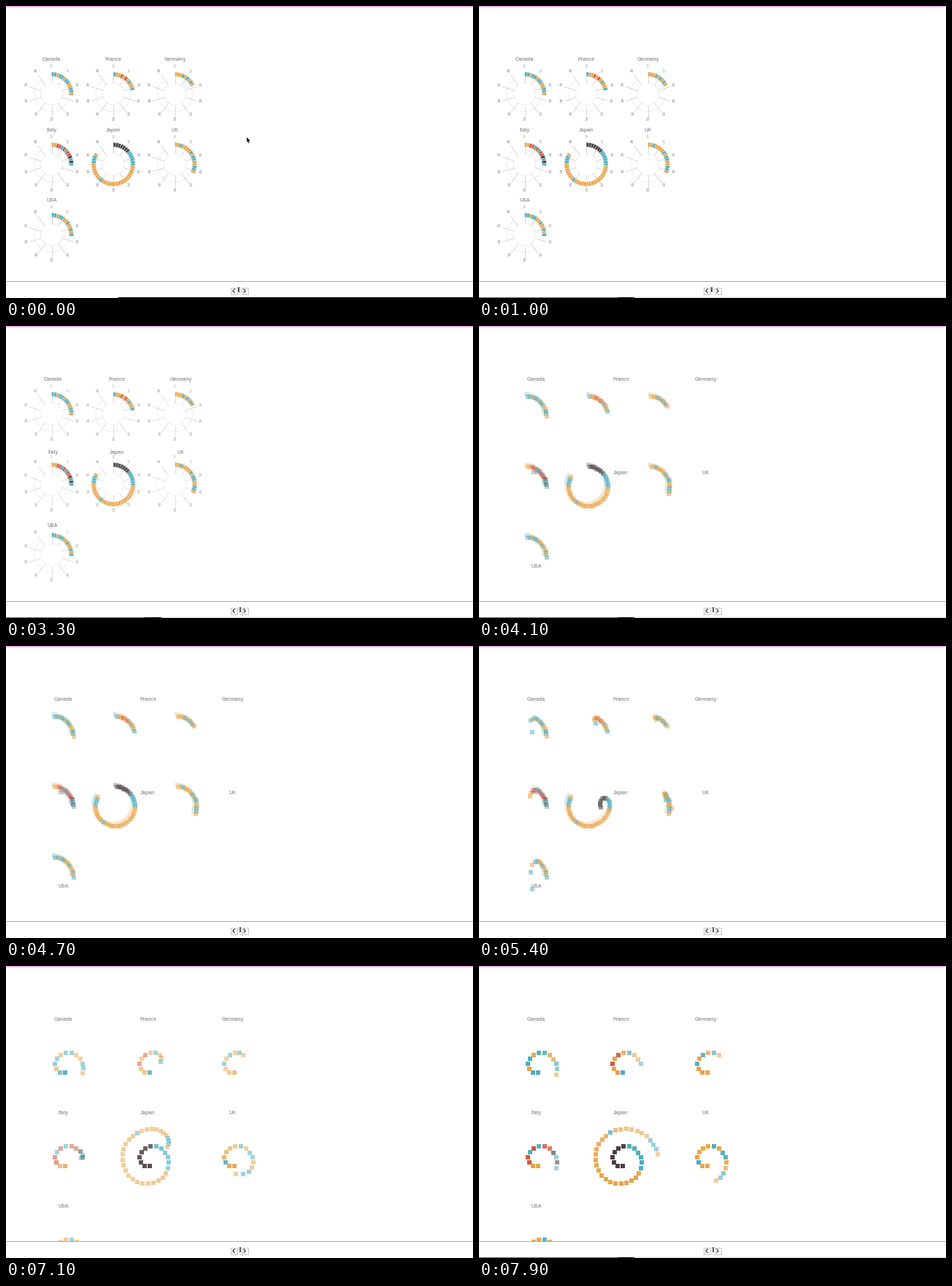
Write a matplotlib script that moves like this. It is 640 px wide and 400 px high and loops after 8000 ms.

```python
import numpy as np
import matplotlib.pyplot as plt
from matplotlib.animation import FuncAnimation
from matplotlib.collections import LineCollection, PolyCollection
from matplotlib.colors import to_rgb
from matplotlib.patches import Arc, Polygon, Rectangle

W, H, DPI = 640, 400, 100
FRAMES, STEP = 80, 100
PX = 72 / DPI
MORPH = 3000                 # rings start turning into squares, ms
MOVE, FADE = 1667, 1150      # spiral flight and solidifying times, ms
DIM, GHOST = 0.53, 0.3       # opacity of waiting squares and leftover arcs
SIZE = 6

COLORS = dict(b="#4dafc0", o="#e9a54b", r="#d4573f", k="#4b4041")

# name, item types, first and last launch in ms, bend of the launch curve
COUNTRIES = [
    ("Canada", "bbobbobboobbo", 4610, 5870, 0.6),
    ("France", "boororoboob", 4805, 6050, 0.95),
    ("Germany", "ooobobobo", 4930, 5833, 0.85),
    ("Italy", "oorrbrbrrkbkb", 4825, 6090, 1.05),
    ("Japan", "k" * 7 + "b" * 6 + "o" * 17 + "b" + "o" * 7 + "bbbo",
     4667, 6050, 1.1),
    ("UK", "ooboooobobboobbo", 4650, 5990, 1.25),
    ("USA", "bbobbooboobob", 4633, 5870, 0.78),
]


def ease(u):
    u = np.clip(u, 0, 1)
    return np.where(u < 0.5, 4 * u**3, 1 - 4 * (1 - u)**3)


def polar(r, turn):
    """Point at radius r, clockwise from the top, in degrees."""
    a = np.radians(turn)
    return np.stack([r * np.sin(a), -r * np.cos(a)], axis=-1)


def spiral(n, gap=7.52):
    """Evenly spaced points on an Archimedean spiral starting at the bottom."""
    th = np.linspace(0, 13, 4000)
    b = 24 / (2 * np.pi)
    r = 7.5 + b * th
    length = np.concatenate([[0], np.cumsum(np.hypot(r, b)[:-1] * np.diff(th))])
    t = np.interp(np.arange(n) * gap, length, th)
    return polar(7.5 + b * t, 180 + np.degrees(t))


fig = plt.figure(figsize=(W / DPI, H / DPI), dpi=DPI, facecolor="white")
ax = fig.add_axes([0, 0, 1, 1])
ax.set(xlim=(0, W), ylim=(H, 0))
ax.axis("off")


def bar(x, y, w, h, color, **kw):
    return ax.add_patch(Rectangle((x, y), w, h, fc=color, lw=0, **kw))


def label(x, y, s, px, color, **kw):
    return ax.text(x, y, s, fontsize=px * PX, color=color, ha="center",
                   va="baseline", family="Liberation Sans", **kw)


def draw_grid(c):
    """Dial with ten spokes and their numbers; returns its artists."""
    turns = np.arange(10) * 36
    spokes = np.stack([c + polar(15, turns), c + polar(32, turns)], axis=1)
    parts = [ax.add_collection(
        LineCollection(spokes, colors="#b4b4b4", linewidths=0.5 * PX, zorder=1))]
    for r in (15, 24):
        parts.append(ax.add_patch(
            Arc(c, 2 * r, 2 * r, theta1=-90, theta2=234, ec="#c0c0c0",
                lw=0.5 * PX, ls=(0, (1.5, 1.5)), zorder=1)))
    for i, (x, y) in enumerate(c + polar(36.5, turns)):
        parts.append(label(x, y + 0.4, str(5 * i), 4.8, "#8c8c8c"))
    return parts


grid, titles = [], []
slices, homes, goals, colors, starts = [], [], [], [], []
for k, (name, kinds, first, last, bend) in enumerate(COUNTRIES):
    row, col = divmod(k, 3)
    old = np.array([62.5 + 84.5 * col, 72.5 + 96.5 * row])
    new = np.array([78.5 + 116 * col, 72.5 + 128 * row])
    titles.append((label(*old, name, 7, "#999999", weight="bold", zorder=2),
                   old, new))
    hub = old + (0, 48)
    grid += draw_grid(hub)

    n = len(kinds)
    a = np.arange(n) * 7.2
    slices.append(hub + np.stack(
        [polar(30, a), polar(30, a + 7.2), polar(24, a + 7.2), polar(24, a)],
        axis=1))
    homes.append(hub + polar(27, a + 3.6) + SIZE / 2)
    goals.append(new + (2.75, 66.25) + spiral(n))
    colors += [to_rgb(COLORS[c]) for c in kinds]
    starts.append(first + (last - first) * np.linspace(0, 1, n) ** bend)

slices, homes, goals, starts = map(
    np.concatenate, (slices, homes, goals, starts))
square = SIZE / 2 * np.array([[-1, -1], [1, -1], [1, 1], [-1, 1]])


def add_tiles(verts, **kw):
    tiles = ax.add_collection(PolyCollection(verts, zorder=3, **kw))
    tiles.set_clip_path(Rectangle((0, 0), W, 377, transform=ax.transData))
    return tiles


def tint(tiles, alpha):
    tiles.set_facecolor(np.column_stack([colors, alpha]))


arcs = add_tiles(slices, linewidths=0.5 * PX)
squares = add_tiles(homes[:, None] + square, linewidths=0)

# frame and controls
bar(0, 0, W, 1, "#ff80ff")
bar(0, 377, W, 1, "#acacac", zorder=4)
for x, d in ((307, -1), (322, 1)):
    ax.add_patch(Rectangle((x + 0.5, 385.5), 9, 9, fc="white", ec="#c4c4c4",
                           lw=PX, zorder=5))
    cx = x + 5
    ax.plot([cx - 1.2 * d, cx + 1.2 * d, cx - 1.2 * d], [387.8, 390.2, 392.6],
            color="#222222", lw=1.1 * PX, zorder=6)
knob = bar(318, 385, 2.2, 7, "#555555", zorder=6)
cursor = ax.add_patch(Polygon(
    np.array([330, 180]) + [(0, 0), (0, 6.5), (1.5, 5.2), (2.6, 8),
                            (3.7, 7.5), (2.6, 4.8), (4.6, 4.6)],
    fc="black", lw=0, zorder=7))

bold_edge = [bar(154, 398.8, W - 154, 1.2, "black")]
thin_edge = [bar(0, 399, W, 1, "#d0d0d0"), bar(0, 399, 190, 1, "#606060"),
             bar(190, 399, 23, 1, "black")]


def draw(i):
    t = i * STEP
    p = float(ease((t - MORPH) / 1000))
    flight = (t - starts) / MOVE
    solid = ease((t - starts - MOVE) / FADE)

    left = np.clip(1 - 4 * flight, 0, 1)
    tint(arcs, (1 + (GHOST - 1) * p) * left)
    arcs.set_edgecolor((1, 1, 1, 0.75 * (1 - p)))
    spots = homes + (goals - homes) * ease(flight)[:, None]
    squares.set_verts(spots[:, None] + square)
    tint(squares, DIM * p + (1 - DIM) * solid)

    for text, old, new in titles:
        x, y = old + (new - old) * p
        text.set_position((x, y + 2.5))
    for item in grid:
        item.set_alpha(1 - float(ease((t - MORPH) / 800)))

    knob.set_x(318 if t < MORPH else 319.5)
    cursor.set_visible(t < 1000)
    for item in bold_edge:
        item.set_visible(t < 1000)
    for item in thin_edge:
        item.set_visible(1000 <= t < 4600 or t >= 7300)
    return []


anim = FuncAnimation(fig, draw, frames=FRAMES, interval=STEP, repeat=True,
                     repeat_delay=0, blit=False)
plt.show()
```
